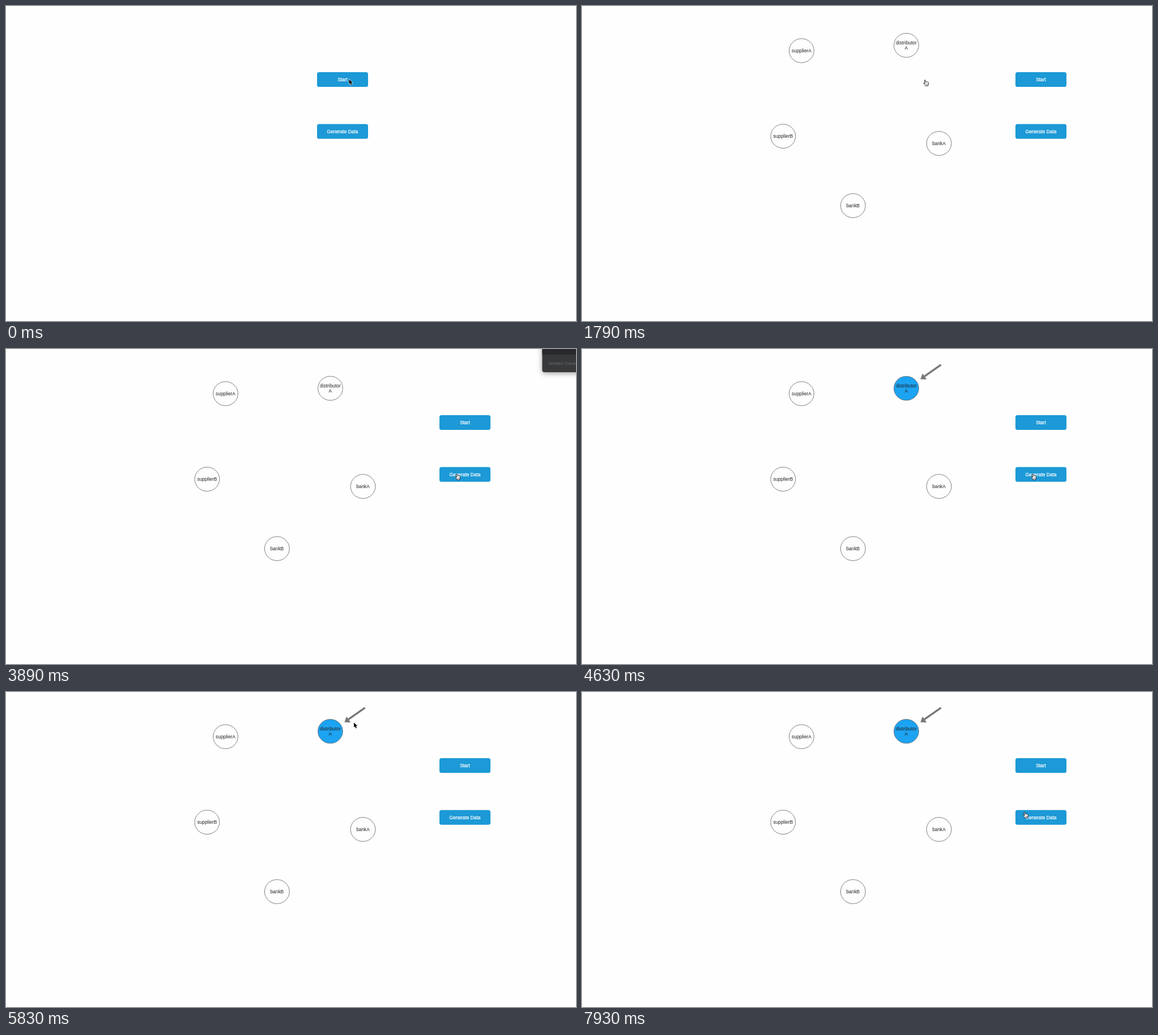
An HTML page with a canvas for the animation above (8000 ms loop, 1006 px wide and 557 px high).

```html
<!DOCTYPE html>
<html lang="en">
<head>
<meta charset="utf-8">
<title>Network demo</title>
<style>
html, body { margin: 0; width: 100%; height: 100%; overflow: hidden; background: #fefefe; }
canvas { display: block; }
</style>
</head>
<body>
<canvas id="stage" width="1006" height="557"></canvas>
<script>
const ctx = document.getElementById('stage').getContext('2d');
const LOOP = 8000, STEP = 150, OFFSET = 140;
const HOVER = 1490, START = 1790, POPUP = 1940, MOVE = 2390, CLOSE = 4330, GENERATE = 4630;
const BUTTON = { w: 90, h: 26, ys: [117, 208.7] };
const SANS = '"Liberation Sans", Arial, sans-serif';

const nodes = [
  { x: 387.5, y: 79, text: ['supplierA'] },
  { x: 572.4, y: 69.5, text: ['distributor', 'A'], target: true },
  { x: 354.9, y: 230.2, text: ['supplierB'] },
  { x: 630, y: 243, text: ['bankA'] },
  { x: 478.3, y: 353, text: ['bankB'] }
];

// Pointer key points, joined by a smooth curve
const keys = [
  { t: 0, x: 605, y: 129 },
  { t: 2240, x: 605, y: 129 },
  { t: 2690, x: 752, y: 130 },
  { t: 2990, x: 835, y: 146 },
  { t: 3290, x: 818, y: 200 },
  { t: 3890, x: 795, y: 219 },
  { t: 4630, x: 795, y: 219 },
  { t: 5230, x: 634, y: 10 },
  { t: 5530, x: 636, y: 50 },
  { t: 5830, x: 593, y: 57 },
  { t: 6130, x: 583, y: 96 },
  { t: 6730, x: 592, y: 100 },
  { t: 6880, x: 592, y: 100 },
  { t: 7180, x: 728, y: 177 },
  { t: 7330, x: 728, y: 177 },
  { t: 7930, x: 789, y: 216 },
  { t: 8000, x: 789, y: 216 }
];

const arrowShape = new Path2D('M0 0V9.3L2.1 7.3L3.7 10.9L5.3 10.2L3.8 6.7H6.7Z');
const handShape = new Path2D(
  'M3.5 6.4L2.4 2C2.1 .5 3.7 .1 4.1 1.5L4.9 4.3' +
  'C5.3 3.5 6.4 3.7 6.6 4.5C7.1 3.8 8.1 4.1 8.3 4.9' +
  'C9 4.4 9.7 4.8 9.7 5.8C9.8 7.6 9 8.5 8.8 11.2H4.2' +
  'C3.8 9.5 2 8.2 1 7.2C.3 6.2 1.2 5.4 2.1 6.1L3.5 7.2Z');
const handLines = new Path2D('M5.4 7.5V9.6M6.8 7.5V9.6M8.1 7.5V9.6');

function slope(i, axis) {
  const a = keys[i - 1], k = keys[i], b = keys[i + 1];
  const rests = p => !p || (p.x === k.x && p.y === k.y);
  return rests(a) || rests(b) ? 0 : (b[axis] - a[axis]) / (b.t - a.t);
}

function curve(i, axis, t) {
  const a = keys[i], b = keys[i + 1], d = b.t - a.t;
  const u = (t - a.t) / d, v = 1 - u;
  return a[axis] * v * v * (1 + 2 * u) + b[axis] * u * u * (3 - 2 * u) +
    d * u * v * (slope(i, axis) * v - slope(i + 1, axis) * u);
}

// The pointer is sampled on a fixed grid of steps
function pointerAt(t) {
  const s = Math.max(0, Math.floor((t - OFFSET) / STEP) * STEP + OFFSET);
  const i = keys.findLastIndex(k => s >= k.t);
  return [curve(i, 'x', s), curve(i, 'y', s)];
}

const buttonX = t => t < START ? 549 : 765;

// Hover is only updated when the pointer moves
function hovers(t, x, y) {
  if (t < MOVE) return t >= HOVER;
  const left = buttonX(t);
  return x > left && x < left + BUTTON.w &&
    BUTTON.ys.some(top => y > top && y < top + BUTTON.h);
}

function label(text, x, y, color) {
  ctx.font = '8.4px ' + SANS;
  ctx.textAlign = 'center';
  ctx.textBaseline = 'alphabetic';
  ctx.fillStyle = color;
  ctx.fillText(text, x, y);
}

function button(text, x, y) {
  ctx.fillStyle = '#1c99d6';
  ctx.beginPath();
  ctx.roundRect(x, y, BUTTON.w, BUTTON.h, 3.5);
  ctx.fill();
  const cx = x + BUTTON.w / 2, base = y + 16.1;
  label(text, cx, base, '#fff');
  ctx.strokeStyle = '#fff';
  ctx.lineWidth = 0.25;
  ctx.strokeText(text, cx, base);
}

function node(n, active) {
  ctx.beginPath();
  ctx.ellipse(n.x, n.y, 21.9, 21.3, 0, 0, Math.PI * 2);
  if (active) {
    ctx.fillStyle = '#1ca3f1';
    ctx.fill();
  }
  ctx.strokeStyle = '#606060';
  ctx.lineWidth = 0.8;
  ctx.stroke();
  const top = n.y + 3 - (n.text.length - 1) * 4.8;
  n.text.forEach((s, i) => label(s, n.x, top + i * 9.6, '#222'));
}

function marker() {
  ctx.strokeStyle = ctx.fillStyle = '#777';
  ctx.lineWidth = 3.4;
  ctx.beginPath();
  ctx.moveTo(633.6, 27.8);
  ctx.lineTo(604, 48.6);
  ctx.stroke();
  ctx.beginPath();
  ctx.moveTo(597.3, 53.4);
  ctx.lineTo(601, 43.2);
  ctx.lineTo(608.2, 53.8);
  ctx.fill();
}

function popup() {
  ctx.save();
  ctx.shadowColor = 'rgba(0,0,0,.4)';
  ctx.shadowBlur = 10;
  ctx.shadowOffsetY = 2;
  ctx.fillStyle = '#38393b';
  ctx.beginPath();
  ctx.roundRect(946.4, -10, 90, 51, 4);
  ctx.fill();
  ctx.restore();
  ctx.fillStyle = '#29292b';
  ctx.fillRect(946.4, 0, 60, 10.3);
  ctx.fillStyle = '#6b6c6e';
  ctx.textAlign = 'left';
  ctx.textBaseline = 'alphabetic';
  ctx.font = '7.8px Roboto, sans-serif';
  ctx.fillText('Zembru Translate', 957, 28.4);
}

function pointer(t) {
  const [x, y] = pointerAt(t);
  ctx.save();
  ctx.lineJoin = 'round';
  if (hovers(t, x, y)) {
    ctx.translate(x - 3, y + 1);
    ctx.fillStyle = '#fff';
    ctx.strokeStyle = '#111';
    ctx.lineWidth = 0.9;
    ctx.fill(handShape);
    ctx.stroke(handShape);
    ctx.lineWidth = 0.5;
    ctx.stroke(handLines);
  } else {
    ctx.translate(x + 0.5, y + 0.4);
    ctx.scale(0.94, 0.94);
    ctx.strokeStyle = '#fff';
    ctx.lineWidth = 1.2;
    ctx.stroke(arrowShape);
    ctx.fillStyle = '#000';
    ctx.fill(arrowShape);
  }
  ctx.restore();
}

function draw(t) {
  const generated = t >= GENERATE;
  ctx.fillStyle = '#fefefe';
  ctx.fillRect(0, 0, 1006, 557);
  if (t >= START) nodes.forEach(n => node(n, generated && n.target));
  ['Start', 'Generate Data'].forEach((s, i) => button(s, buttonX(t), BUTTON.ys[i]));
  if (generated) marker();
  if (t >= POPUP && t < CLOSE) popup();
  pointer(t);
}

const begin = performance.now();
function tick() {
  draw((performance.now() - begin) % LOOP);
  requestAnimationFrame(tick);
}
tick();
</script>
</body>
</html>
```
